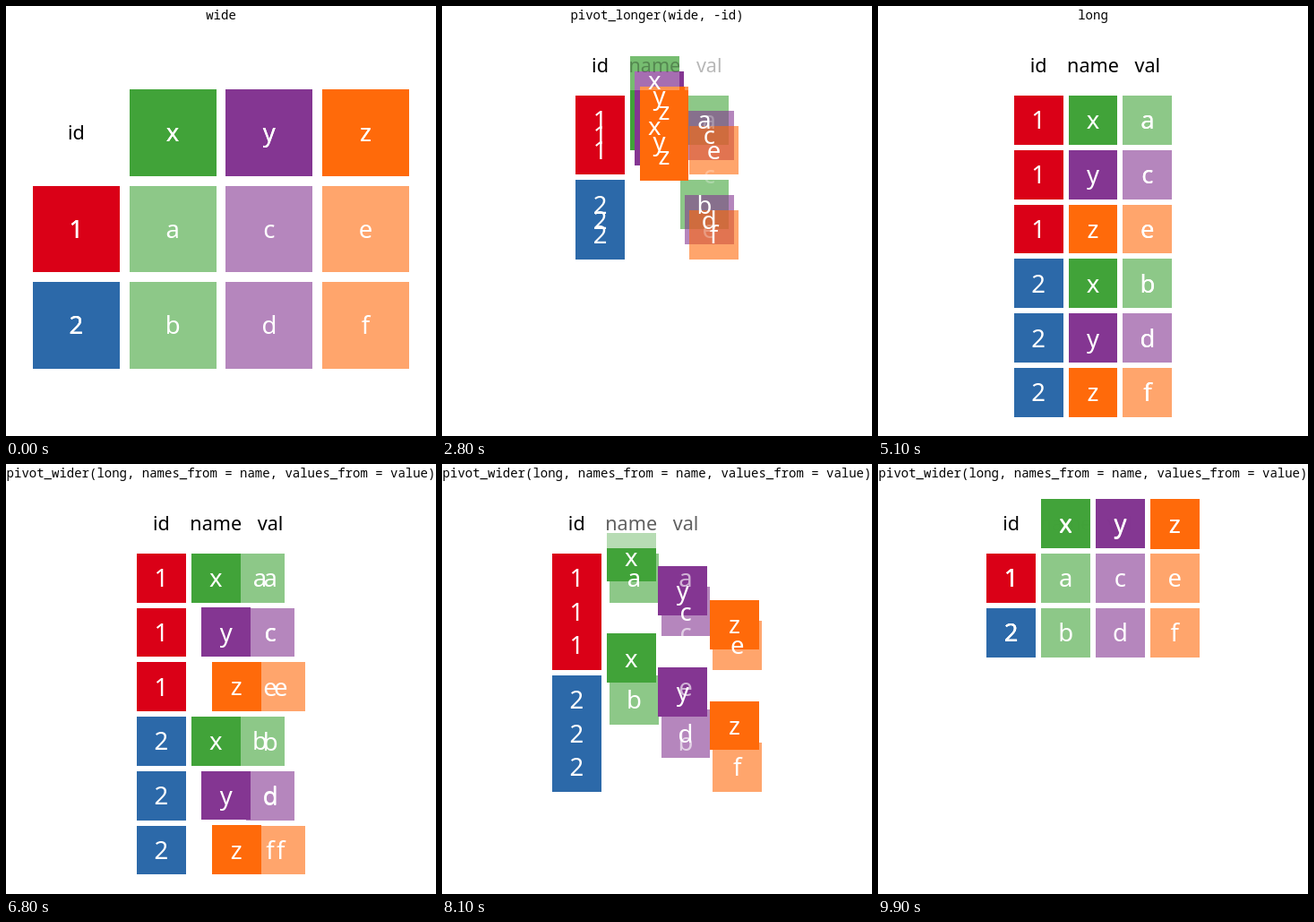
An HTML page for the animation above (10000 ms loop, 480 by 480 pixels).

```html
<!DOCTYPE html>
<html lang="en">
<head>
<meta charset="utf-8">
<title>Pivot longer and wider</title>
<style>
  html, body { margin: 0; width: 100%; height: 100%; overflow: hidden; background: #fff; }
  svg { display: block; width: 100%; height: 100%; }
  rect { shape-rendering: crispEdges; }
  text { text-anchor: middle; font-family: "Noto Sans", "Open Sans", sans-serif; }
  .cell { font-size: 27.5px; fill: #fff; }
  .head { font-size: 21.6px; fill: #000; }
  .title { font: 14px "Noto Sans Mono", "DejaVu Sans Mono", monospace; fill: #000; }
</style>
</head>
<body>
<svg id="stage" viewBox="0 0 480 480">
  <rect width="480" height="480" fill="#fff"/>
  <g id="tiles"></g>
  <g id="labels"></g>
  <text id="title" class="title" x="240" y="15"></text>
</svg>
<script>
const NS = "http://www.w3.org/2000/svg";
const LOOP = 10000, STEP = 100;
const CENTER = { x: 240, y: 249 };
const WIDE_PITCH = 420 / 3.9, LONG_PITCH = 420 / 6.9;
const TILE = 0.9;
const ID_COLORS = ["#da0017", "#2c69a9"];
const KEY_COLORS = ["#41a339", "#843692", "#ff6a0a"];
const VALUES = ["ace", "bdf"];

// Column positions are in tile units from the stage center.
const wideCol = c => c - 1.5;
const longCol = c => c - 1;

const byId = id => document.getElementById(id);
const lerp = (a, b, k) => a + (b - a) * k;

function add(parent, tag, attrs) {
  const el = document.createElementNS(NS, tag);
  for (const name in attrs) el.setAttribute(name, attrs[name]);
  return byId(parent).appendChild(el);
}

const items = [];

// wide and long are [column, row] pairs.
function addTile(wide, long, fill, opacity = 1, fades = false) {
  const el = add("tiles", "rect", { fill, opacity });
  items.push({ el, wide, long, fades, tile: true });
}

function addLabel(text, kind, wide, long, fades = false) {
  const el = add("labels", "text", { class: kind });
  el.textContent = text;
  items.push({ el, wide, long, fades, drop: kind === "head" ? 7.9 : 9.8 });
}

function build() {
  const cells = [], keys = [], ids = [];
  for (let id = 0; id < 2; id++) {
    for (let k = 0; k < 3; k++) {
      const row = 1 + id * 3 + k;
      cells.push({ text: VALUES[id][k], k, row, wide: [wideCol(k + 1), id + 1], long: [longCol(2), row] });
      ids.push({ text: id + 1, id, wide: [wideCol(0), id + 1], long: [longCol(0), row] });
    }
  }
  for (let k = 0; k < 3; k++) {
    for (let id = 0; id < 2; id++) {
      keys.push({ text: "xyz"[k], k, wide: [wideCol(k + 1), 0], long: [longCol(1), 1 + id * 3 + k] });
    }
  }
  const heads = ["id", "name", "val"].map((text, c) =>
    ({ text, fades: c > 0, wide: [wideCol(c), 0], long: [longCol(c), 0] }));

  cells.forEach(c => addTile(c.wide, c.long, KEY_COLORS[c.k], 0.6));
  ids.forEach(c => addTile(c.wide, c.long, ID_COLORS[c.id]));
  keys.forEach(c => addTile(c.wide, c.long, KEY_COLORS[c.k]));
  heads.forEach(h => addTile(h.wide, h.long, "#fff", 1, h.fades));

  heads.forEach(h => addLabel(h.text, "head", h.wide, h.long, h.fades));
  // Value labels that fade in place beside the moving ones.
  cells.forEach(c => addLabel(c.text, "cell", [wideCol(2), c.row], c.long, true));
  [...ids, ...keys, ...cells].forEach(c => addLabel(c.text, "cell", c.wide, c.long));
}

const expoOut = u => u >= 1 ? 1 : 1 - 2 ** (-10 * u);
const sineInOut = u => (1 - Math.cos(Math.PI * u)) / 2;

// kx and ky run from 0 (wide) to 1 (long).
function pose(time) {
  if (time < 1700) return { title: "wide", kx: 0, ky: 0, pitch: WIDE_PITCH, midRow: 1 };
  const view = { pitch: LONG_PITCH, midRow: 3 };
  if (time < 5100) {
    const u = (time - 1600) / 3400;
    return { title: "pivot_longer(wide, -id)", kx: expoOut(u), ky: sineInOut(u), ...view };
  }
  if (time < 6800) return { title: "long", kx: 1, ky: 1, ...view };
  const u = (time - 6700) / 3300;
  return {
    title: "pivot_wider(long, names_from = name, values_from = value)",
    kx: 1 - expoOut(u), ky: 1 - sineInOut(u), ...view
  };
}

function draw(time) {
  const { title, kx, ky, pitch, midRow } = pose(time);
  const size = pitch * TILE;
  byId("title").textContent = title;
  for (const { el, wide, long, fades, tile, drop } of items) {
    const x = CENTER.x + lerp(wide[0], long[0], kx) * pitch;
    const y = CENTER.y + (lerp(wide[1], long[1], ky) - midRow) * pitch;
    el.setAttribute("x", tile ? x - size / 2 : x);
    el.setAttribute("y", tile ? y - size / 2 : y + drop);
    if (tile) {
      el.setAttribute("width", size);
      el.setAttribute("height", size);
    }
    if (fades) el.setAttribute("opacity", ky);
  }
}

build();
const start = performance.now();
function tick() {
  const time = (performance.now() - start) % LOOP;
  draw(Math.floor(time / STEP) * STEP);
  requestAnimationFrame(tick);
}
tick();
</script>
</body>
</html>
```
